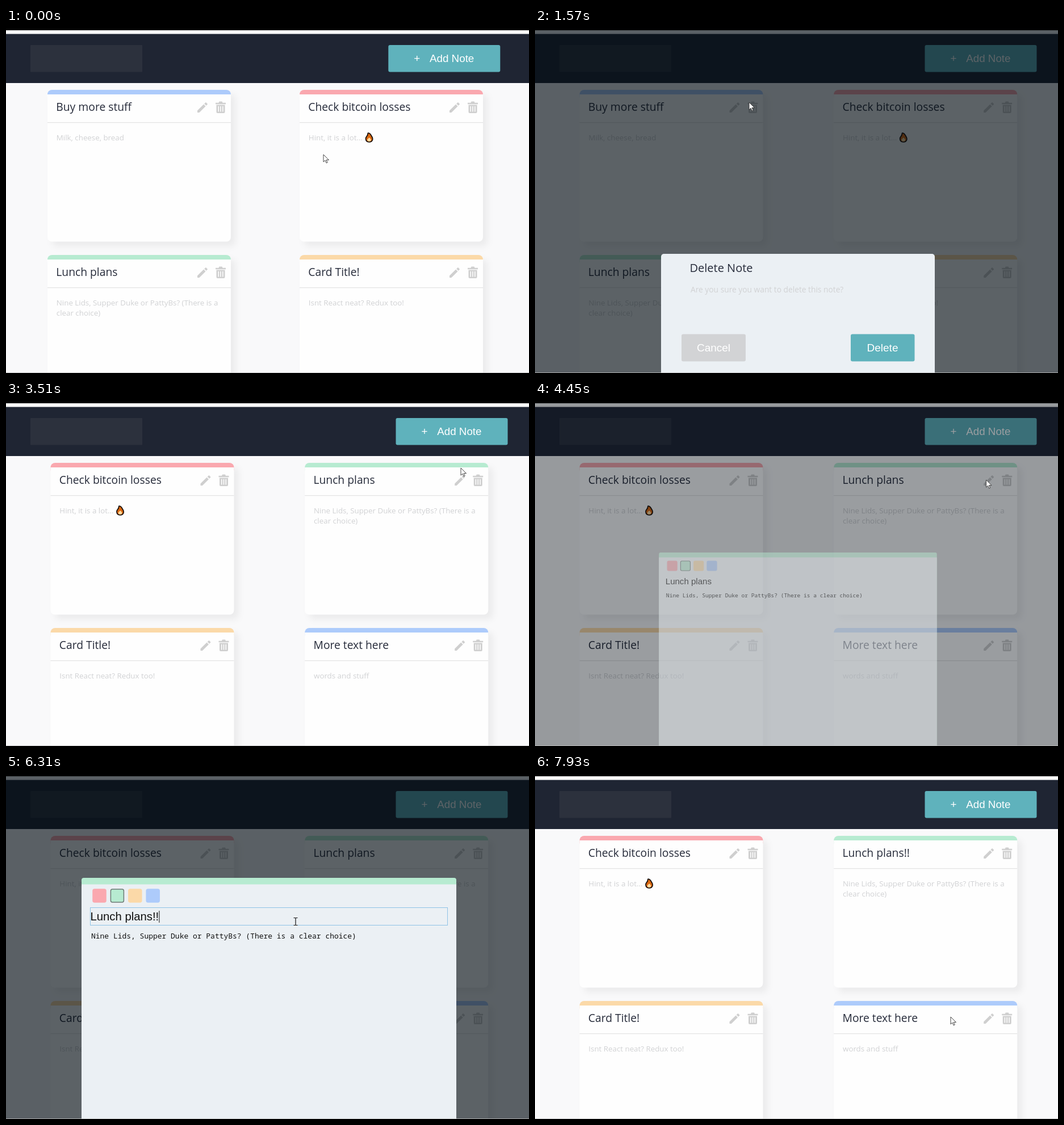
An HTML page for the animation above (8000 ms loop, 921 by 608 pixels).

```html
<!DOCTYPE html>
<html lang="en">
<head>
<meta charset="utf-8">
<title>Notes</title>
<style>
  html, body { margin: 0; height: 100%; overflow: hidden; background: #f9f9fa; }
  svg { display: block; width: 100vw; height: 100vh; }
  text { white-space: pre; }
  .title { font: 19.3px "Open Sans", sans-serif; fill: #262b3a; }
  .body { font: 13.35px "Open Sans", sans-serif; fill: #d1d2d4; }
  .button { font: 18.8px "Liberation Sans", Arial, sans-serif; fill: #fff; }
  .mono { font: 12.97px "Noto Sans Mono", monospace; fill: #111; }
  .card { filter: drop-shadow(8px 8px 6px rgba(0, 0, 0, .055)); }
  .icon { fill: #cfcfcf; }
</style>
</head>
<body>
<svg viewBox="0 0 921 608">
  <defs>
    <g id="pencil" class="icon">
      <path d="M3 17.6V21h3.4L17.5 9.9 14.1 6.5ZM15.2 5.4l3.4 3.4 2-2q.8-.7 0-1.4l-2-2q-.7-.8-1.4 0Z"/>
    </g>
    <g id="trash" class="icon">
      <path d="M0 2.2H5.5L6.5 0H11.5L12.5 2.2H18V4.8H0Z"/>
      <path d="M1.5 6H16.5V18.5a2 2 0 0 1-2 2H3.5a2 2 0 0 1-2-2ZM4.4 8.2V18H6V8.2ZM8.2 8.2V18H9.8V8.2ZM12 8.2V18H13.6V8.2Z" fill-rule="evenodd"/>
    </g>
    <g id="flame" stroke-linejoin="round">
      <path d="M-2-8C1-8 3-5 4-3 6 0 6.500 2 6 4 5 7 3 8 0 8-4 8-6 6-6 2-6-1-4-2-3-4Z" fill="#d9660f" stroke="#120c08" stroke-width="1.7"/>
      <path d="M0 0C2 2 4 3 3 5.500 2 7.300-2 7.300-3 5.500-4 3-1 2 0 0Z" fill="#ffdca0"/>
    </g>
  </defs>

  <rect width="921" height="608" fill="#f9f9fa"/>
  <g id="cards"></g>
  <rect y="10.500" width="921" height="86.500" fill="#1f2533"/>
  <rect x="43" y="30" width="197" height="47.500" rx="1" fill="#2c313d"/>
  <g id="add">
    <rect width="197" height="47.500" rx="3" fill="#5fb2bc"/>
    <text class="button" x="45" y="30">+</text>
    <text class="button" x="72.700" y="30">Add Note</text>
  </g>
  <rect id="overlay" y="4" width="921" height="604" fill="#030c12"/>

  <g id="confirm">
    <rect x="222" y="398" width="482" height="222" rx="5" fill="#ebf0f4"/>
    <text class="title" x="272.500" y="429.500" style="font-size:20px">Delete Note</text>
    <text class="body" x="274" y="465.500" style="font-size:13.78px">Are you sure you want to delete this note?</text>
    <rect x="258" y="539.500" width="113" height="48" rx="3" fill="#d2d3d5"/>
    <rect x="556" y="539.500" width="112.500" height="48" rx="3" fill="#5fb2bc"/>
    <text class="button" x="314.500" y="570" text-anchor="middle" style="font-size:19px">Cancel</text>
    <text class="button" x="612" y="570" text-anchor="middle" style="font-size:19px">Delete</text>
  </g>

  <g id="editor">
    <rect x="133" y="183" width="660" height="651" rx="4" fill="#b7ebd1"/>
    <rect x="133" y="194.500" width="660" height="640" fill="#ebf0f4"/>
    <g id="swatches"></g>
    <rect id="focus" x="148.500" y="235.500" width="629" height="31" fill="none" stroke="#8fc3e6"/>
    <text id="field" class="button" x="148.500" y="258" style="font-size:20.3px;fill:#111"></text>
    <path id="caret" d="M0 241V262" stroke="#111"/>
    <text class="mono" x="150" y="289.500">Nine Lids, Supper Duke or PattyBs? (There is a clear choice)</text>
  </g>

  <rect width="921" height="4"/>
  <rect y="607" width="921" height="1" fill="#bbb" opacity=".75"/>
  <g id="arrow"><path d="M0 0V13L3 10.200 5.200 15 7.200 14 5 9.600H9.500Z" fill="#fff" stroke="#333" stroke-width=".9"/></g>
  <g id="beam"><path d="M-3.500-6.500H-1L0-6 1-6.500H3.500M0-6V6M-3.500 6.500H-1L0 6 1 6.500H3.500" fill="none" stroke="#111" stroke-width="1.200"/></g>
</svg>

<script>
const LOOP = 8000;
const RED = '#faa8af', GREEN = '#b7ebd1', ORANGE = '#fbd9a8', BLUE = '#adcbfb';
const $ = id => document.getElementById(id);

const notes = [
  ['Buy more stuff', BLUE, 'Milk, cheese, bread'],
  ['Check bitcoin losses', RED, 'Hint, it is a lot...'],
  ['Lunch plans', GREEN, 'Nine Lids, Supper Duke or PattyBs? (There is a', 'clear choice)'],
  ['Card Title!', ORANGE, 'Isnt React neat? Redux too!'],
  ['More text here', BLUE, 'words and stuff'],
];

$('cards').innerHTML = notes.map(([title, color, ...lines], i) => `
  <g class="card">
    <rect width="323" height="20" rx="8" fill="${color}"/>
    <path d="M0 8H323V259.500a8 8 0 0 1-8 8H8a8 8 0 0 1-8-8Z" fill="#fefefe"/>
    <path d="M0 57.700H323" stroke="#e3e3e4" stroke-width="1.300"/>
    <text class="title" x="15.300" y="37">${title}</text>
    ${lines.map((line, n) => `<text class="body" x="15.800" y="${88.5 + n * 18}">${line}</text>`).join('')}
    ${i === 1 ? '<use href="#flame" x="122.500" y="84"/>' : ''}
    <use href="#pencil" x="261" y="19"/>
    <use href="#trash" x="296" y="20.500"/>
  </g>`).join('');
const cards = [...$('cards').children];

$('swatches').innerHTML = [RED, GREEN, ORANGE, BLUE].map((color, i) =>
  `<rect x="${153 + i * 31.4}" y="203" width="23" height="23" rx="3" fill="${color}"
    stroke="${color === GREEN ? '#6d7a75' : color}" stroke-width="1.500"/>`).join('');

// Screen updates come in bursts: first, last, number of updates
const bursts = [
  [0, 0, 1], [110, 870, 11], [940, 1110, 3], [1490, 2260, 11], [2340, 3110, 11],
  [3190, 3980, 11], [4070, 4150, 2], [4450, 5230, 11], [5380, 5620, 4],
  [6000, 6000, 1], [6230, 6770, 8], [7230, 7620, 6], [7850, 7930, 2],
];

// Pointer stops: time, x, y
const stops = [
  [0, 559, 223], [110, 557, 228], [340, 510, 252], [600, 420, 200], [760, 338, 135],
  [870, 355, 118], [1110, 377, 131], [1570, 377, 131], [2180, 612, 568], [2580, 615, 570],
  [3110, 790, 62], [3506, 801, 118], [3980, 789, 139], [4150, 794.5, 139], [4450, 794.5, 139],
  [5230, 600, 215], [5620, 510, 260], [6310, 510, 260], [6770, 656, 547], [7230, 656, 547],
  [7620, 700, 562], [7850, 712, 500], [7930, 732, 428],
];

const ramp = (t, from, to) => Math.min(1, Math.max(0, (t - from) / (to - from)));
const show = (id, on) => $(id).style.display = on ? '' : 'none';
const move = (el, x, y) => el.setAttribute('transform', `translate(${x} ${y})`);

function snap(t) {
  const [start, end, count] = bursts.findLast(b => b[0] <= t);
  const step = (end - start) / (count - 1) || 1;
  return Math.min(end, start + Math.floor((t - start) / step + 1e-6) * step);
}

function pointer(t) {
  const i = stops.findLastIndex(s => s[0] <= t);
  const a = stops[i], b = stops[i + 1] || a;
  const raw = ramp(t, a[0], b[0] === a[0] ? a[0] + 1 : b[0]);
  const k = b[0] - a[0] > 450 ? raw * raw * (3 - 2 * raw) : raw;
  return [a[1] + (b[1] - a[1]) * k, a[2] + (b[2] - a[2]) * k];
}

// Places a dialog and returns how dark its backdrop is
function dialog(id, t, opens, closes) {
  const enter = ramp(t, opens, opens + 149), stay = 1 - ramp(t, closes, closes + 415);
  const p = enter * stay, scale = .5 + .5 * p;
  show(id, p > 0);
  $(id).setAttribute('opacity', p);
  $(id).setAttribute('transform', `translate(463 508.5) scale(${scale}) translate(-463 -508.5)`);
  return .64 * enter ** .65 * stay ** 1.2;
}

function draw(t) {
  const wide = t >= 1490, deleted = t >= 2340, saved = t >= 7230;
  const columns = wide ? [78.5, 526.2] : [73, 517];
  cards.forEach((card, i) => {
    const slot = i - deleted;
    card.style.display = slot < 0 ? 'none' : '';
    move(card, columns[slot & 1] ?? 0, 109 + 291 * (slot >> 1));
  });
  cards[2].querySelector('.title').textContent = saved ? 'Lunch plans!!' : 'Lunch plans';
  move($('add'), wide ? 686.5 : 673.3, 30);

  const dark = Math.max(dialog('confirm', t, 1418, 2315), dialog('editor', t, 4378, 7205));
  $('overlay').setAttribute('opacity', dark);

  const typed = (t >= 6000) + (t >= 6230), focused = t >= 5620 && !saved;
  $('field').textContent = 'Lunch plans' + '!'.repeat(typed);
  show('focus', focused);
  show('caret', focused);
  move($('caret'), 258.5 + typed * 5.7, 0);

  const beam = t >= 5540 && !saved, at = pointer(t);
  show('beam', beam);
  show('arrow', !beam);
  move($('beam'), ...at);
  move($('arrow'), ...at);
}

function tick() {
  draw(snap(performance.now() % LOOP));
  requestAnimationFrame(tick);
}
tick();
</script>
</body>
</html>
```
